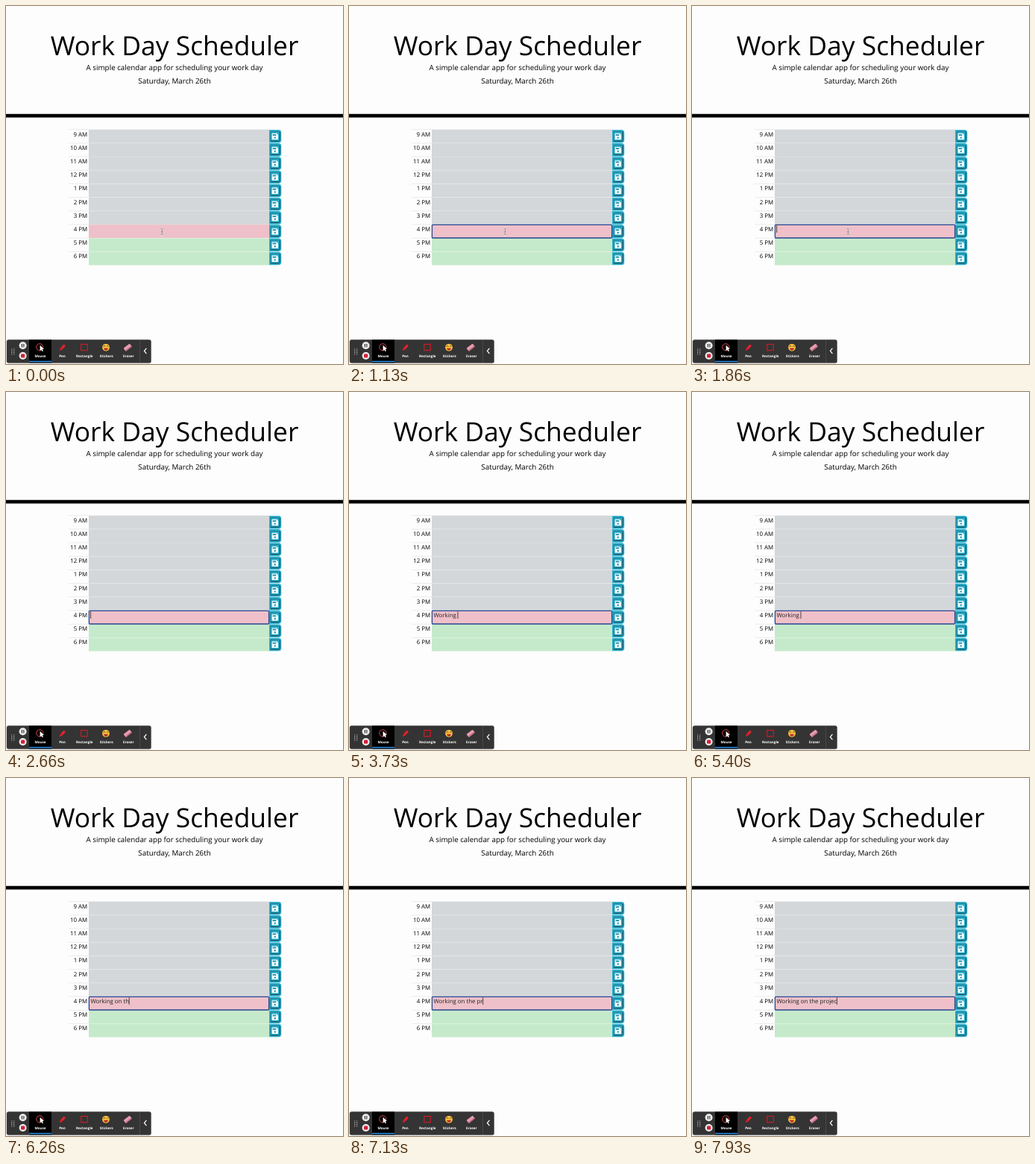
Animation, 452 px wide and 480 px high, one loop 8 s. Source, as an HTML page:

```html
<!DOCTYPE html>
<html lang="en">
<head>
<meta charset="utf-8">
<title>Work Day Scheduler</title>
<style>
  html, body { margin: 0; width: 100%; height: 100%; overflow: hidden; background: #fdfdfd; }
  svg { display: block; width: 452px; height: 480px; }
  text { font-family: "Open Sans", sans-serif; font-size: 7.87px; text-rendering: geometricPrecision; white-space: pre; }
  .mid { text-anchor: middle; }
  .lead { font-size: 9.83px; }
  .tool { font-size: 4.6px; font-weight: 700; fill: #fff; text-anchor: middle; }
</style>
</head>
<body>
<svg viewBox="0 0 452 480">
  <defs>
    <g id="save">
      <path d="M353 .3h12.5q3.8 0 3.8 3.8v10q0 3.8-3.8 3.8H353z" fill="#2fb1cd"/>
      <path d="M355 15.6h10.6q1.6 0 1.6-1.6V3" fill="none" stroke="#12343f"/>
      <path d="M355 15.6V2.8h10.6q1.6 0 1.6 1.6" fill="none" stroke="#176c80" stroke-width=".9"/>
      <path d="M357.3 5.2h5.7l2 2v5.6q0 .7-.7.7h-7q-.7 0-.7-.7V5.9q0-.7.7-.7z" fill="#f5fcfd"/>
      <path d="M357.7 6.3h4.6v2h-4.6z" fill="#2796b0"/>
      <circle cx="360.8" cy="11" r="1.2" fill="#2796b0"/>
    </g>
  </defs>

  <text class="mid" x="226" y="66" style="font-size:35.4px">Work Day Scheduler</text>
  <text class="mid lead" x="226" y="86">A simple calendar app for scheduling your work day</text>
  <text class="mid lead" x="226" y="103.6">Saturday, March 26th</text>
  <path d="M0 144.7h452v4.8H0z"/>

  <g id="rows"></g>
  <rect id="focus" x="111.4" y="293.4" width="241.2" height="17.6" rx="1" fill="none" stroke="#25468f" stroke-width="1.3"/>
  <text id="entry" x="113.5" y="301.9" fill="#222"></text>
  <path id="caret" d="M0 294.3v9.6" stroke="#222" stroke-width=".8"/>
  <g id="beam" fill="none">
    <path d="M207.6 298.4q1.7 0 1.7 1.3 0-1.3 1.7-1.3M209.3 299.5v6M207.6 306.7q1.7 0 1.7-1.3 0 1.3 1.7 1.3" stroke="#fff" stroke-width="1.7"/>
    <path d="M207.6 298.4q1.7 0 1.7 1.3 0-1.3 1.7-1.3M209.3 299.5v6M207.6 306.7q1.7 0 1.7-1.3 0 1.3 1.7 1.3M208.2 302.8h2.2" stroke="#77676b" stroke-width=".8"/>
  </g>

  <g id="toolbar">
    <rect x=".6" y="447.2" width="194.4" height="32" rx="3" fill="#aaa"/>
    <rect x="1" y="447.5" width="193.5" height="31" rx="2.5" fill="#343434"/>
    <path d="M31 447.5h30v31H31z" fill="#000"/>
    <path d="M31 475.8h30v1.7H31z" fill="#2585d8"/>
    <path d="M179.5 448v30" stroke="#555" stroke-width=".7"/>
    <path d="M7.7 459.5v8M10.7 459.5v8" stroke="#c8c8c8" stroke-width="1.1" stroke-dasharray="1.1 1.2"/>
    <circle cx="22.6" cy="455.2" r="5" fill="#eee"/>
    <path d="M21.4 453v4.4M23.8 453v4.4" stroke="#333" stroke-width="1.2"/>
    <circle cx="22.6" cy="469" r="5" fill="#eee"/>
    <rect x="20" y="466.4" width="5.2" height="5.2" rx="1" fill="#d71f3a"/>
    <circle cx="45.3" cy="457.4" r="4.6" fill="none" stroke="#e04a4a" stroke-width="1"/>
    <path d="M45.6 454.8v7.6l1.8-1.7 1.3 2.5 1.2-.6-1.2-2.4 2.3-.2z" fill="#fff"/>
    <path d="M71.6 462.2l1.7-4 4.2-4.8 2.5 2.2-4.2 4.8z" fill="#e2222b"/>
    <path d="M74.3 459l1.8 1.6" stroke="#801219" stroke-width=".7"/>
    <rect x="100.7" y="453.5" width="8.6" height="8.2" fill="none" stroke="#d31c25" stroke-width="1.1"/>
    <circle cx="134" cy="457.8" r="4.9" fill="#f8c440"/>
    <path d="M130.3 456.8l1.7-1.6 1.2 1.6M135 456.8l1.4-1.6 1.5 1.6" stroke="#713b18" fill="none" stroke-width=".9"/>
    <path d="M131 458.7h6q-.7 3-3 3t-3-3z" fill="#b62b28"/>
    <g transform="rotate(-38 163.2 457.8)">
      <rect x="158" y="455.2" width="10.4" height="5.2" rx="1" fill="#e89bad"/>
      <path d="M158 459h10.4v1.4H158z" fill="#b96680"/>
    </g>
    <path d="M188.4 458.8l-3 3.7 3 3.7" fill="none" stroke="#fff" stroke-width="1.2"/>
  </g>
</svg>
<script>
const $ = id => document.getElementById(id);
const LOOP = 8000, FOCUS = 400, BEAM_HIDDEN = 2600, BLINK = 500;
const PHRASE = "Working on the projec";
const KEY_TIMES = [2700, 2800, 2900, 3000, 3100, 3190, 3290, 3390,
  5520, 5680, 5840, 6040, 6200, 6400, 6560, 6850, 7050, 7250, 7550, 7700, 7860];

const ROW = 18.2, TOP = 165.6;
const hours = ["9 AM", "10 AM", "11 AM", "12 PM", "1 PM", "2 PM", "3 PM", "4 PM", "5 PM", "6 PM"];
const rowColor = i => i < 7 ? "#d3d7da" : i === 7 ? "#efc0c9" : "#c5eacb";

$("rows").innerHTML = hours.map((hour, i) => `
  <g transform="translate(0 ${TOP + i * ROW})">
    <path d="M84 0h27" stroke="#dedede" stroke-width=".6"/>
    <path d="M111 0h242v${ROW}H111z" fill="${rowColor(i)}"/>
    <path d="M111 0h242" stroke="#fff" stroke-opacity=".35" stroke-width=".6"/>
    <text x="109" y="9.1" text-anchor="end">${hour}</text>
    <use href="#save"/>
  </g>`).join("");

const labels = { Mouse: 46, Pen: 75.5, Rectangle: 105.2, Stickers: 134.7, Eraser: 164.3 };
$("toolbar").innerHTML += Object.entries(labels).map(([name, x]) =>
  `<text class="tool" x="${x}" y="470.6">${name}</text>`).join("");

const show = (id, on) => $(id).setAttribute("visibility", on ? "visible" : "hidden");

function draw(now) {
  const t = now % LOOP;
  const typed = KEY_TIMES.filter(time => time <= t).length;
  const entry = $("entry");
  entry.textContent = PHRASE.slice(0, typed);

  // The caret's blink restarts with every key.
  const lastAction = typed ? KEY_TIMES[typed - 1] : FOCUS;
  const caretX = 113.6 + (typed ? entry.getComputedTextLength() : 0);
  $("caret").setAttribute("transform", `translate(${caretX} 0)`);
  show("caret", t >= FOCUS && (t - lastAction) % (2 * BLINK) < BLINK);
  show("focus", t >= FOCUS);
  show("beam", t < BEAM_HIDDEN);
}

const start = performance.now();
function frame() {
  draw(performance.now() - start);
  requestAnimationFrame(frame);
}
frame();
</script>
</body>
</html>
```
